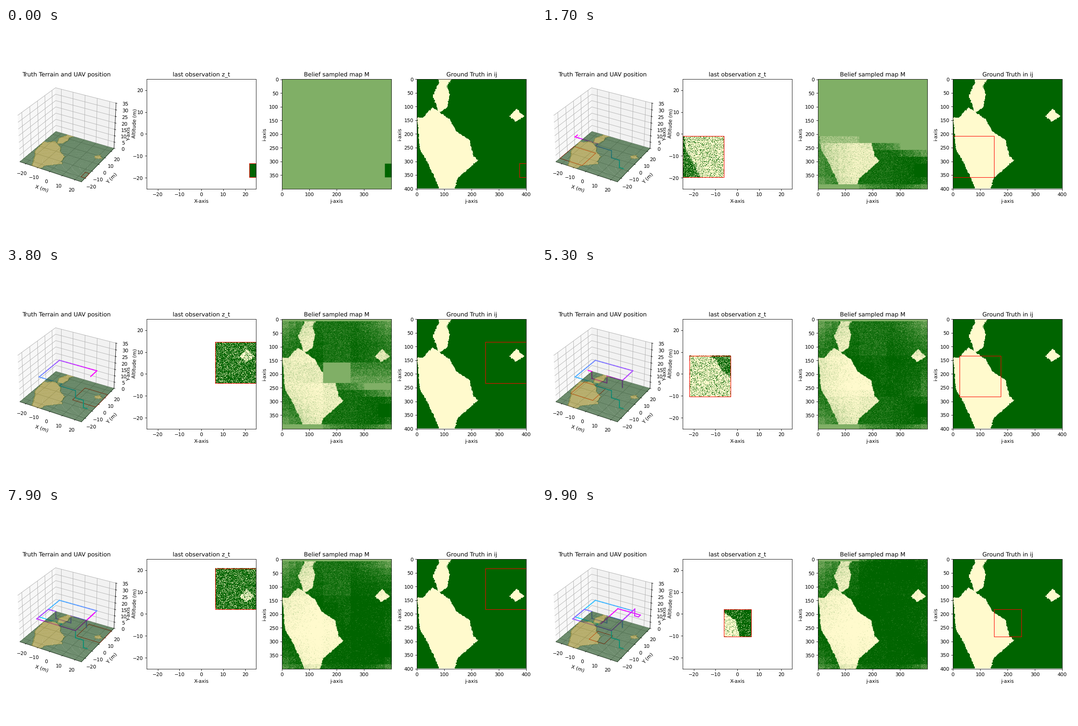
Animation of 1183 by 473 pixels, one loop 10 s. Source, as a matplotlib script:

```python
import itertools

import matplotlib.pyplot as plt
import numpy as np
from matplotlib.animation import FuncAnimation
from matplotlib.colors import LinearSegmentedColormap
from matplotlib.path import Path
from mpl_toolkits.mplot3d.art3d import Line3DCollection, Poly3DCollection

W, H, DPI = 1183, 473, 78.867
SIDE = 244.2            # panel size in pixels
N = 400                 # map cells per side
CELLS_PER_M = 8
STEP = 25               # cells per horizontal move
LEVEL = 5.41            # metres per altitude level
FRAMES = 100

# Key points of each coast as (j, i) cells; noise adds the small bays.
COASTS = [
    [(-9, 138), (25, 141), (57, 104), (74, 112), (93, 128), (122, 148),
     (143, 189), (195, 225), (207, 282), (225, 297), (190, 328), (149, 362),
     (138, 409), (84, 409), (64, 356), (39, 303), (12, 257), (2, 150)],
    [(80, -9), (82, 15), (59, 61), (82, 124), (112, 102), (121, 57),
     (110, 25), (135, -9)],
    [(338, 136), (366, 109), (393, 138), (361, 156)],
]

# Compass moves, U/D for altitude, H for hovering.
ROUTE = ("W1 U1 W2 U1 W4 N1 W6 N9 E10 S5 D1 U1 W4 D1 W4 U1 W2 S5 H1 "
         "E10 N11 D1 E1 N1 H1 W6 S8")
MOVES = {"W": (0, -1, 0), "E": (0, 1, 0), "N": (-1, 0, 0), "S": (1, 0, 0),
         "U": (0, 0, 1), "D": (0, 0, -1), "H": (0, 0, 0)}

CMAP = LinearSegmentedColormap.from_list("land", ["darkgreen", "lemonchiffon"])
LAND, FOREST = (0.58, 0.53, 0.13, 0.35), (0.12, 0.31, 0.12, 0.35)


def block_noise(rng, size, amp):
    cells = N // size + 1
    noise = rng.uniform(-amp, amp, (cells, cells))
    return np.kron(noise, np.ones((size, size)))[:N, :N]


def make_terrain():
    rng = np.random.default_rng(4)
    grid = [axis + 0.5 + block_noise(rng, 8, 1.5) + block_noise(rng, 3, 1)
            for axis in np.mgrid[:N, :N]]
    points = np.column_stack([grid[1].ravel(), grid[0].ravel()])
    land = np.zeros(N * N, bool)
    for coast in COASTS:
        land |= Path(coast + coast[:1]).contains_points(points)
    return land.reshape(N, N)


def make_route():
    pose = np.array([333, 400, 1])
    poses = [pose]
    for leg in ROUTE.split():
        for _ in range(int(leg[1:])):
            pose = pose + np.array(MOVES[leg[0]]) * (STEP, STEP, 1)
            poses.append(pose)
    return poses


def to_metres(i, j):
    return (j - N / 2) / CELLS_PER_M, (N / 2 - i) / CELLS_PER_M


def footprint(n):
    """Visible cell range: top, bottom, left, right."""
    i, j, level = poses[n]
    half = STEP * level
    return (*np.clip([i - half, i + half], 0, N),
            *np.clip([j - half, j + half], 0, N))


def observe(n):
    """Terrain in view; the higher the flight, the more wrong cells."""
    top, bottom, left, right = footprint(n)
    view = terrain[top:bottom, left:right]
    wrong = np.random.default_rng(100 + n).random(view.shape)
    return view ^ (wrong < 0.105 * (poses[n][2] - 1))


def make_beliefs():
    """Bayesian log-odds update of the map, one image per frame."""
    odds = np.zeros((N, N))
    maps = []
    for n in range(FRAMES):
        top, bottom, left, right = footprint(n)
        err = 0.001 + 0.145 * (poses[n][2] - 1)
        gain = np.log((1 - err) / err)
        odds[top:bottom, left:right] += np.where(observe(n), gain, -gain)
        maps.append(np.uint8(np.round(255 / (1 + np.exp(-odds)))))
    return maps


def floor_quads(size=4):
    """Merge equal neighbours in each coarse row into one quad."""
    quads, colors = [], []
    coarse = terrain[size // 2::size, size // 2::size]
    for r, row in enumerate(coarse):
        c = 0
        for land, run in itertools.groupby(row):
            end = c + len(list(run))
            x0, y0 = to_metres(r * size, c * size)
            x1, y1 = to_metres((r + 1) * size, end * size)
            quads.append([(x0, y0, 0), (x1, y0, 0), (x1, y1, 0), (x0, y1, 0)])
            colors.append(LAND if land else FOREST)
            c = end
    return quads, colors


def panel(k, title, **kw):
    box = [(12.6 + 301.5 * k) / W, 0.5 - SIDE / 2 / H, SIDE / W, SIDE / H]
    ax = fig.add_axes(box, **kw)
    ax.set_title(title)
    return ax


def label(ax, x, y, xticks, yticks):
    ax.set(xlabel=x, ylabel=y, xticks=xticks, yticks=yticks)


terrain = make_terrain()
poses = make_route()
beliefs = make_beliefs()
track = np.array([(*to_metres(i, j), z * LEVEL) for i, j, z in poses])

plt.rcParams["text.hinting"] = "none"
fig = plt.figure(figsize=((W + 1e-6) / DPI, (H + 1e-6) / DPI), dpi=DPI)
tens = range(-20, 21, 10)

# Terrain and flight path
ax3 = panel(0, "Truth Terrain and UAV position", projection="3d",
            computed_zorder=False)
label(ax3, "X (m)", "Y (m)", tens, tens)
ax3.set(zlabel="Altitude (m)", zticks=range(0, 36, 5))
quads, quad_colors = floor_quads()
# Edges need an explicit clear colour, or they take the face colour.
ax3.add_collection3d(Poly3DCollection(
    quads, facecolors=quad_colors, edgecolors=[(0, 0, 0, 0)] * len(quads),
    linewidths=0, antialiased=False, zorder=3))
ground_box, = ax3.plot([], [], [], color="red", lw=1, zorder=2)
trail = Line3DCollection([track[:2]], linewidths=2, capstyle="projecting",
                         zorder=2)
ax3.add_collection3d(trail)
ax3.set(xlim=(-25, 25), ylim=(-25, 25), zlim=(0, 35))

# Last observation
ax_obs = panel(1, "last observation z_t")
obs_img = ax_obs.imshow(np.full((N, N), np.nan), cmap=CMAP, vmin=0, vmax=1,
                        extent=(-25, 25, -25, 25), aspect="auto",
                        interpolation="nearest")
obs_box, = ax_obs.plot([], [], color="red", lw=1)
ax_obs.set(xlim=(-25, 25), ylim=(-25, 25))
label(ax_obs, "X-axis", "Y-axis", tens, tens)

# Belief
ax_bel = panel(2, "Belief sampled map M")
bel_img = ax_bel.imshow(beliefs[0], cmap=CMAP, vmin=0, vmax=255, aspect="auto")
label(ax_bel, "j-axis", "i-axis", range(0, 301, 100), range(0, 351, 50))

# Ground truth
ax_true = panel(3, "Ground Truth in ij")
ax_true.imshow(terrain, cmap=CMAP, aspect="auto", interpolation="nearest",
               extent=(-0.5, 399.5, 399, -0.5))
true_box, = ax_true.plot([], [], color="red", lw=1)
ax_true.set(xlim=(0, N), ylim=(N, 0))
label(ax_true, "j-axis", "i-axis", range(0, 401, 100), range(0, 401, 50))


def update(n):
    top, bottom, left, right = footprint(n)
    js = np.array([left, right, right, left, left])
    rows = np.array([top, top, bottom, bottom, top])
    xs, ys = to_metres(rows, js)

    seen = np.full((N, N), np.nan)
    seen[top:bottom, left:right] = observe(n)
    obs_img.set_data(seen)
    obs_box.set_data(xs, ys)
    bel_img.set_data(beliefs[n])
    true_box.set_data(js, rows)
    ground_box.set_data_3d(xs, ys, np.zeros(5))

    trail.set_visible(n > 0)
    if n:
        trail.set_segments([track[k:k + 2] for k in range(n)])
        trail.set_color(plt.cm.cool(np.linspace(0, 1, n)))
    return obs_img, obs_box, bel_img, true_box, ground_box, trail


anim = FuncAnimation(fig, update, frames=FRAMES, interval=100, repeat=True,
                     repeat_delay=0, blit=False)
plt.show()
```
